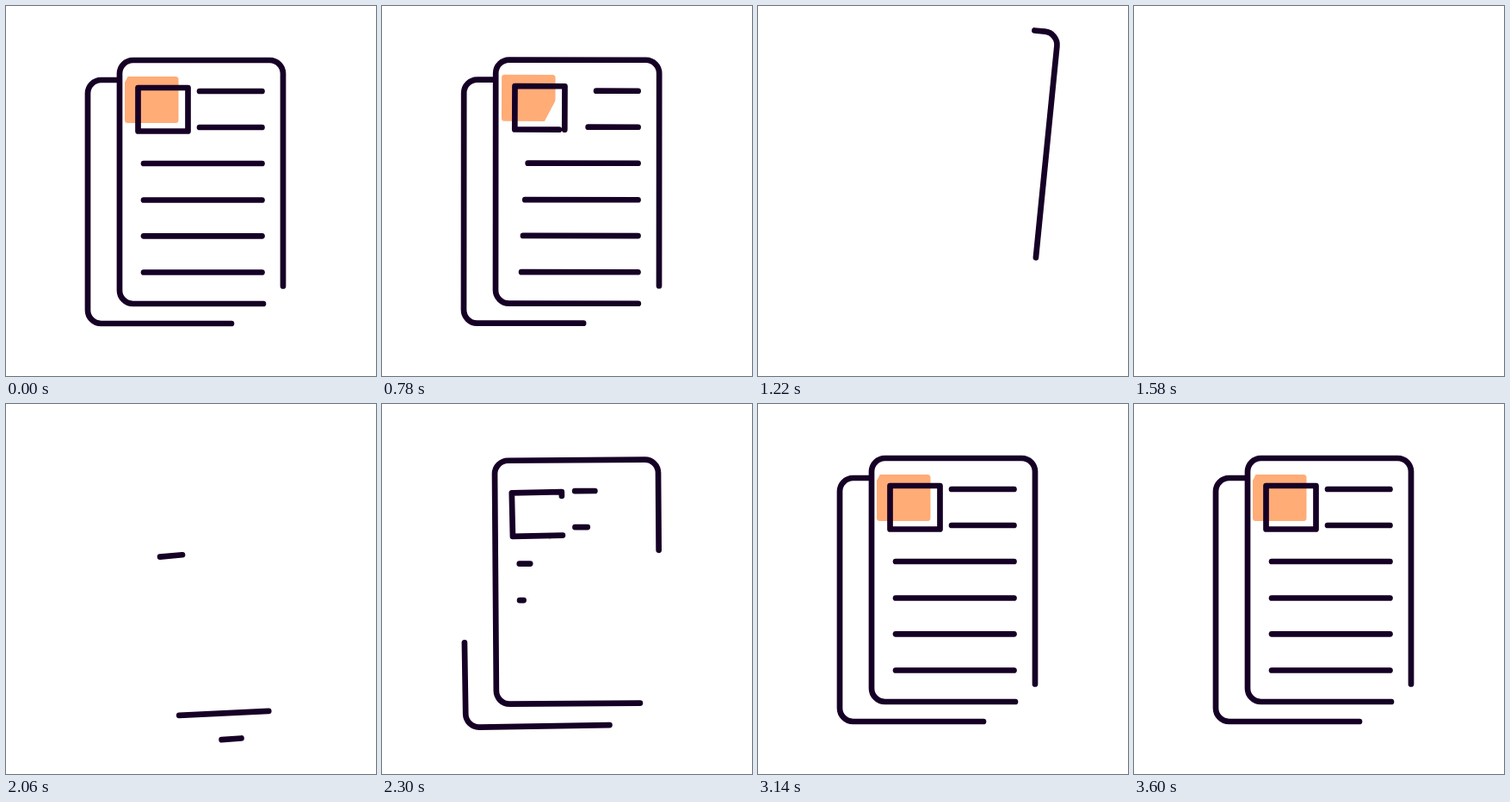
Animation, 430 px wide and 430 px high, one loop 3640 ms. Source, as an HTML page:

```html
<!DOCTYPE html>
<html lang="en">
<head>
<meta charset="utf-8">
<title>Document</title>
<style>
  html, body { margin: 0; width: 100%; height: 100%; overflow: hidden; background: #fff; }
  svg { display: block; width: 100vw; height: 100vh; }
  .ink { fill: none; stroke: #160026; stroke-width: 6.7; stroke-linecap: round; stroke-linejoin: round; }
</style>
</head>
<body>
<svg viewBox="0 0 430 430">
  <clipPath id="wipe"><rect id="band" y="-300" height="600" transform="rotate(27.6)"/></clipPath>
  <g id="patch"><rect x="138" y="82" width="62.5" height="54" rx="3.5" fill="#ffac77" clip-path="url(#wipe)"/></g>
  <g class="ink" id="strokes"></g>
</svg>
<script>
const LOOP = 3640, ENTER = 1740, EXIT = 540, STEP = 40;
// Late in the settling the picture only refreshes at these moments.
const TICKS = [2540, 2680, 2720, 2860, 3000, 3140, 3180, 3320, 3460, 3600];

const clamp = x => Math.min(1, Math.max(0, x));

function bezier(x1, x2) {
  return x => {
    if (x <= 0) return 0;
    if (x >= 1) return 1;
    let lo = 0, hi = 1;
    for (let i = 0; i < 24; i++) {
      const p = (lo + hi) / 2, q = 1 - p;
      if (3 * x1 * p * q * q + 3 * x2 * p * p * q + p ** 3 < x) lo = p; else hi = p;
    }
    return lo * lo * (3 - 2 * lo);
  };
}
const easeErase = bezier(0.8, 0.3);
const easeOutline = bezier(0.8, 0.05);
const easeLine = bezier(0.2, 0.2);

// enter and exit are [start, duration]; lead and lag shift the part against the page's motion.
const outline = (d, enter, exit, lag = 0, lead = 0) => ({ d, enter, exit, lag, lead, ease: easeOutline });
const line = (x, y, enter, exit) =>
  ({ d: `M${x} ${y}H297.5`, enter, exit, lag: 0, lead: 0, ease: easeLine });

const parts = [
  outline('M262 369H110.5A15.5 15.5 0 0 1 95 353.5V101.5A15.5 15.5 0 0 1 110.5 86H131',
    [1773, 1171], [628, 548], 81),
  outline('M299 346H147.5A15.5 15.5 0 0 1 132 330.5V78.5A15.5 15.5 0 0 1 147.5 63H306.5A15.5 15.5 0 0 1 322 78.5V325.5',
    [1673, 1163], [740, 820]),
  outline('M211.5 145.5H153.5V95H211.5V145.5', [1625, 1300], [667, 540], 125, 85),
  line(225, 99, [2186, 585], [614, 340]),
  line(225, 141, [2215, 585], [635, 340]),
  line(160, 183, [2238, 640], [618, 548]),
  line(160, 225.5, [2262, 640], [644, 548]),
  line(160, 267.3, [2308, 640], [668, 548]),
  line(160, 309.5, [2352, 640], [696, 548])
];

const strokes = document.getElementById('strokes');
const patch = document.getElementById('patch');
const band = document.getElementById('band');

for (const part of parts) {
  part.el = document.createElementNS('http://www.w3.org/2000/svg', 'path');
  part.el.setAttribute('d', part.d);
  part.el.setAttribute('pathLength', 1);
  strokes.append(part.el);
}

const progress = (t, [start, length]) => (t - start) / length;

function flyOut(t) {
  const k = (Math.max(0, t - 660) / 320) ** 3.2;
  return `translate(0 ${-7.3 * k}) rotate(${0.95 * k} 215 340)`;
}

function flyIn(t) {
  const k = clamp((2570 - t) / 830) ** 3;
  return `translate(0 ${65 * k}) rotate(${-12 * k} 215 215)`;
}

function drawStroke(part, t) {
  const entering = t >= ENTER;
  const from = entering ? 0 : easeErase(progress(t, part.exit));
  const to = entering ? part.ease(progress(t, part.enter)) : 1;
  const { el } = part;
  // A nearly empty stroke would still show its round cap.
  el.style.display = to - from > 0.005 ? '' : 'none';
  el.setAttribute('stroke-dasharray', `${to - from} 2`);
  el.setAttribute('stroke-dashoffset', -from);
  el.setAttribute('transform', entering ? flyIn(t - part.lag) : flyOut(t + part.lead));
}

// The coloured patch is revealed and removed along a slanted edge.
function drawPatch(t) {
  const near = 160.2, far = 240.7, span = far - near;
  let lo = near - 5, hi = far + 5, move;
  if (t >= ENTER) {
    const drop = (0.0031 * Math.max(0, 3266 - t)) ** 3;
    move = `translate(${-0.27 * drop} ${drop}) rotate(${-0.37 * drop} 169 109)`;
    lo = near + span * (0.04 + 0.96 * clamp((3266 - t) / 980) ** 3);
  } else {
    move = flyOut(t + 90);
    if (t < 160) lo = near + span * 0.04;
    if (t >= EXIT) hi = far - span * easeErase(progress(t, [508, 717]));
  }
  patch.setAttribute('transform', move);
  band.setAttribute('x', lo);
  band.setAttribute('width', Math.max(0, hi - lo));
  patch.style.display = hi <= near || lo >= far ? 'none' : '';
}

function stepped(t) {
  if (t < EXIT) return t;
  if (t < TICKS[0]) return EXIT + Math.floor((t - EXIT) / STEP) * STEP;
  return TICKS.filter(tick => tick <= t).pop();
}

const origin = performance.now();
function render() {
  // The extra millisecond absorbs clock rounding at step edges.
  const t = stepped((performance.now() - origin + 1) % LOOP);
  parts.forEach(part => drawStroke(part, t));
  drawPatch(t);
  requestAnimationFrame(render);
}
render();
</script>
</body>
</html>
```
